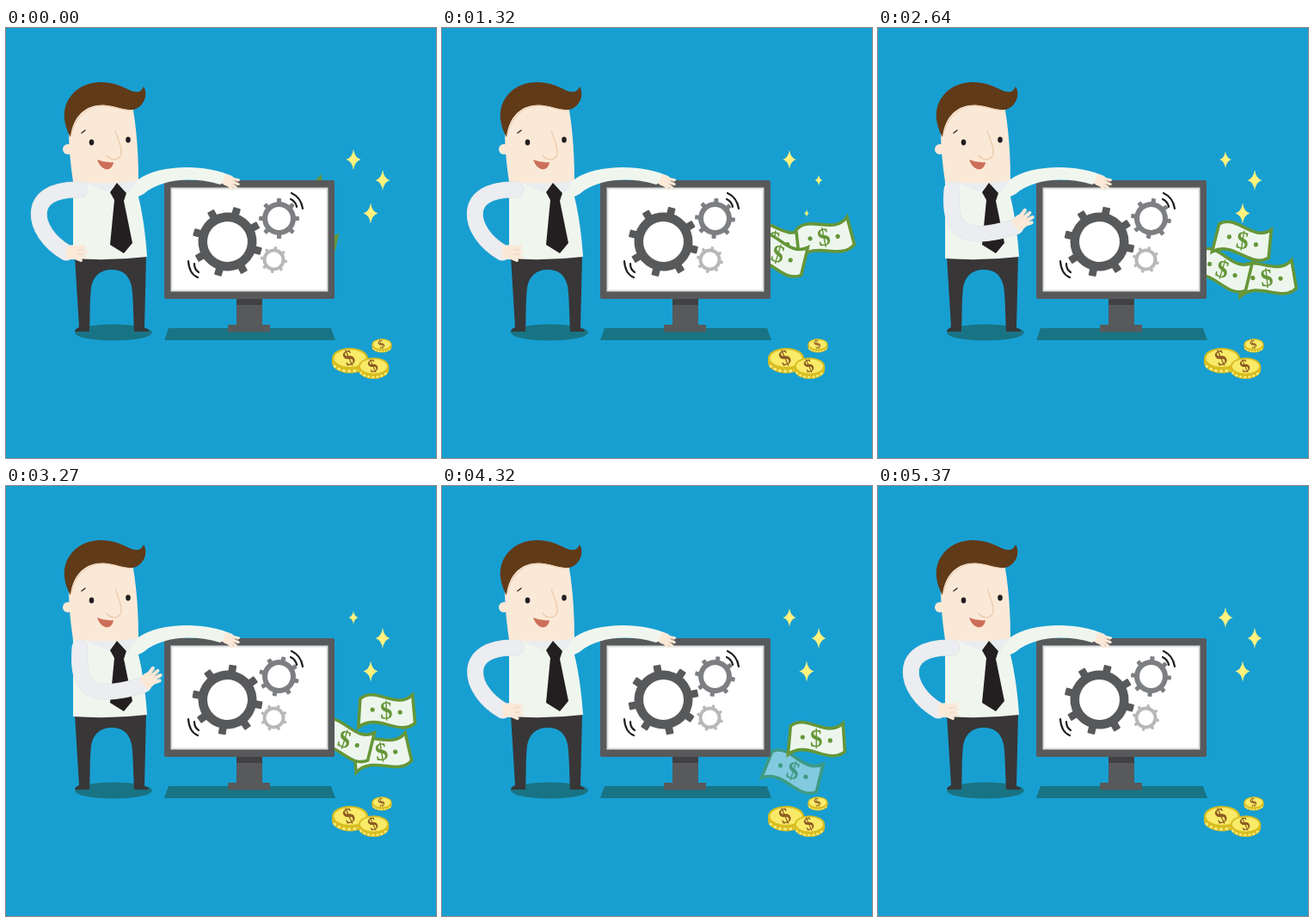
Write an HTML page that moves like this. It is 500x500 px and loops after 5.4 s.

```html
<!DOCTYPE html>
<html lang="en">
<head>
<meta charset="utf-8">
<title>Money from the machine</title>
<style>
  html, body { margin: 0; width: 100%; height: 100%; overflow: hidden; background: #189fd1; }
  svg { display: block; width: 100vw; height: 100vh; }
  text { font-family: "Liberation Serif", serif; font-weight: bold; text-anchor: middle; }
  .line { fill: none; stroke-linecap: round; stroke-linejoin: round; }
  .skin { fill: #fbe9d8; }
  .shadow { fill: #187484; }
</style>
</head>
<body>
<svg viewBox="0 0 500 500">
  <defs>
    <g id="bill">
      <path d="M-30-15C-12-30 12 0 31-18L33 15C14 31-10 1-33 18Z" fill="#edf6ed" stroke="#659638" stroke-width="3.6"/>
      <g fill="#659638">
        <circle cx="-16" cy="-2" r="2.6"/><circle cx="16" cy="2" r="2.6"/>
        <text y="9" font-size="29">$</text>
      </g>
    </g>
    <g id="coin">
      <path d="M-21-2v5a21 12.5 0 0 0 42 0v-5Z" fill="#d8bd22"/>
      <path class="line" d="M-18 7A21 12.5 0 0 0 18 7" stroke="#f9ec79" stroke-width="3" stroke-dasharray="1 5"/>
      <ellipse cy="-2" rx="21" ry="12" fill="#d8bd22"/>
      <ellipse cy="-2" rx="18.5" ry="10" fill="#f9eb68"/>
      <text transform="translate(2 5) rotate(-24)" font-size="25" fill="#8c5b24">$</text>
    </g>
    <path id="star" d="M0-12Q1.5-2 8.5 0Q1.5 2 0 12Q-1.5 2-8.5 0Q-1.5-2 0-12Z" fill="#fff27d"/>
    <g id="hand">
      <path class="skin" d="M-8-7Q1-11 8-6L10 5Q2 10-8 7Z"/>
      <path class="line" d="M2-5L13-7M4-1L15-1M4 3L14 5M2 6L9 9" stroke="#fbe9d8" stroke-width="4"/>
      <path class="line" d="M5-3L13-4M6 2L13 2" stroke="#ebc8b0" stroke-width=".8"/>
    </g>
  </defs>

  <ellipse class="shadow" cx="125" cy="354" rx="45" ry="9.5"/>
  <path class="shadow" d="M184 363L189 349H378L383 363Z"/>
  <g id="bills"></g>

  <path d="M268 315h30v30h9v8.500h-49v-8.500h10Z" fill="#58595b"/>
  <path d="M268 315h30v7h-30Z" fill="#414143"/>
  <rect x="184" y="177" width="198" height="138" rx="2" fill="#58595b"/>
  <rect x="192.5" y="186.5" width="181" height="119" fill="#fff" stroke="#dcdddd" stroke-width="2"/>
  <g id="gears"></g>
  <path class="line" d="M332 192Q343 197 345 210M331 199Q337 202 338 208M212 271Q213 286 223 290M219 274Q219 281 224 284" stroke="#231f20" stroke-width="2.2"/>

  <path d="M80 266L163 264L161 349Q166 350 166 353H149C148 335 148 312 146 300C143 286 134 281 123 281C109 281 101 289 99 302C97 320 98 336 97 353H80Q80 350 85 348Z" fill="#383637"/>
  <path d="M78 179L148 177C157 200 162 236 164 266Q122 271 78 268Z" fill="#f0f6ee"/>
  <path d="M148 180L154 176C177 159 232 157 264 173L249 182C215 172 180 176 160 193L150 198Z" fill="#f0f6ee"/>
  <use href="#hand" transform="translate(259 178) rotate(22) scale(.78)"/>
  <path d="M88 178L118 191L129 180L142 192L154 175Z" fill="#e9edf0"/>
  <path d="M129 180L121 191L126 200L121 252L137 262L147 250L137 201L140 192Z" fill="#231f20"/>

  <circle class="skin" cx="72" cy="141" r="6"/>
  <path class="skin" d="M78 179Q73 145 73 120Q76 88 108 85H146Q154 125 154 177Q140 180 129 180Q104 181 78 179Z"/>
  <path d="M75 127C65 108 65 90 78 76C92 61 118 59 139 70C150 76 157 76 160 68C166 78 160 92 148 95C132 96 122 87 105 90C88 93 77 107 75 127Z" fill="#613a18"/>
  <path class="line" d="M76 125C79 107 90 95 106 91C122 88 132 96 146 96" stroke="#ecd0b5" stroke-width="1.2"/>
  <path class="line" d="M127 120C132 133 136 143 133 149C129 155 120 153 117 148" stroke="#edcfb0" stroke-width="1.5"/>
  <path class="line" d="M88 122L92 119" stroke="#332622" stroke-width="1.5"/>
  <ellipse cx="99.500" cy="133" rx="2.800" ry="3.400" fill="#231f20"/>
  <ellipse cx="142" cy="130" rx="2.800" ry="3.400" fill="#231f20"/>
  <path d="M106 153Q115 157 125 156C123 168 111 167 106 153Z" fill="#cc705a"/>

  <path class="line sleeve" stroke="#dce0e4" stroke-width="19"/>
  <path class="line sleeve" stroke="#ebedf0" stroke-width="18"/>
  <use id="fist" href="#hand"/>

  <use href="#coin" x="400" y="386"/>
  <use href="#coin" transform="translate(427.5 395) scale(.84)"/>
  <use href="#coin" transform="translate(437 369) scale(.55)"/>
  <g id="stars"></g>
</svg>
<script>
const LOOP = 5400, TWINKLE = 855, FADE = 900;
const $ = id => document.getElementById(id);
const clamp = v => Math.min(1, Math.max(0, v));

function add(parent, tag, attrs) {
  const el = document.createElementNS("http://www.w3.org/2000/svg", tag);
  for (const name in attrs) el.setAttribute(name, attrs[name]);
  return $(parent).appendChild(el);
}

const place = (el, x, y, more) => el.setAttribute("transform", `translate(${x} ${y}) ${more}`);
const ring = r => `M${-r} 0a${r} ${r} 0 1 0 ${2 * r} 0a${r} ${r} 0 1 0 ${-2 * r} 0Z`;

function makeGear(x, y, size, color, phase, turns) {
  const tooth = size * .26, tip = size * 1.2;
  const el = add("gears", "g", { fill: color });
  el.innerHTML = `<path fill-rule="evenodd" d="${ring(size)}${ring(size * .7 - .5 + 6 / size)}"/>`;
  for (let a = 0; a < 360; a += 45)
    el.innerHTML += `<rect x="${-tooth / 2}" y="${-tip}" width="${tooth}" height="${tip - size + 2}" rx="1" transform="rotate(${a})"/>`;
  return t => place(el, x, y, `rotate(${phase + 360 * turns * t / LOOP})`);
}

// Smooth curve through evenly timed points, p from 0 to 1.
function spline(points, p) {
  const last = points.length - 1, at = i => points[Math.min(last, Math.max(0, i))];
  const i = Math.min(last - 1, Math.floor(p * last)), u = p * last - i;
  return [0, 1].map(k => {
    const [a, b, c, d] = [i - 1, i, i + 1, i + 2].map(j => at(j)[k]);
    return b + u / 2 * (c - a + u * (2 * a - 5 * b + 4 * c - d + u * (3 * (b - c) + d - a)));
  });
}

// Bills slip out from behind the monitor, drift down and fade.
function makeBill(start, end, tilt, sway, points) {
  const el = add("bills", "use", { href: "#bill" });
  return t => {
    const [x, y] = spline(points, clamp((t - start) / (end - start)));
    place(el, x, y, `rotate(${tilt + sway * Math.cos((t - 2640) / 358)})`);
    el.setAttribute("opacity", clamp((end - t) / FADE));
  };
}

// Stars shrink to a low point once per period and grow back.
function makeStar(x, y, period, low, min, span) {
  const el = add("stars", "use", { href: "#star" });
  return t => {
    const phase = t < 6 * TWINKLE ? t % period : 0;
    place(el, x, y, `scale(${Math.min(1, min + Math.abs(phase - low) / span)})`);
  };
}

// Sleeve control points, wrist, hand angle.
const hip = [20, 186, 30, 238, 70, 261, 0];
const chest = [48, 214, 56, 274, 123, 216, -65];
const point = [82, 235, 98, 251, 160, 231, -42];
const belly = [54, 195, 74, 259, 126, 262, -10];
const poses = [[0, hip], [1330, hip], [1770, chest], [2400, point], [3600, point], [3870, belly], [4350, hip], [LOOP, hip]];

function moveArm(t) {
  const i = poses.findIndex(([time]) => time > t);
  const [t0, from] = poses[i - 1], [t1, to] = poses[i];
  const p = (t - t0) / (t1 - t0), k = p * p * (3 - 2 * p);
  const [ax, ay, bx, by, x, y, angle] = from.map((v, j) => v + (to[j] - v) * k);
  for (const el of document.querySelectorAll(".sleeve"))
    el.setAttribute("d", `M86 188C${ax} ${ay} ${bx} ${by} ${x} ${y}`);
  place($("fist"), x, y, `rotate(${angle}) translate(8 0)`);
}

const parts = [
  makeGear(257.5, 248.5, 34, "#58595b", 16, 1),
  makeGear(317.5, 221.5, 19.5, "#7d7f82", 0, -2),
  makeGear(311.5, 269.5, 13, "#b7b8ba", 8, -2),
  makeBill(300, 2700, 8, 0, [[345, 235], [388, 250], [340, 268]]),
  makeBill(60, 4320, -9, 3, [[337, 196], [446, 240], [430, 247], [452, 290], [431, 316], [412, 350]]),
  makeBill(800, 4770, 17, 0, [[350, 250], [423, 276], [397, 283], [396, 311], [418, 345]]),
  makeBill(1400, 5250, 0, 9, [[345, 215], [411, 241], [443, 263], [436, 293], [408, 320]]),
  makeStar(404, 153, TWINKLE / 2, TWINKLE / 4, .5, TWINKLE / 2),
  makeStar(438, 177, TWINKLE, 540, 0, 140),
  makeStar(424, 215.5, TWINKLE, 458, .3, 150),
  moveArm
];

function tick() {
  const t = performance.now() % LOOP;
  for (const move of parts) move(t);
  requestAnimationFrame(tick);
}
tick();
</script>
</body>
</html>
```
